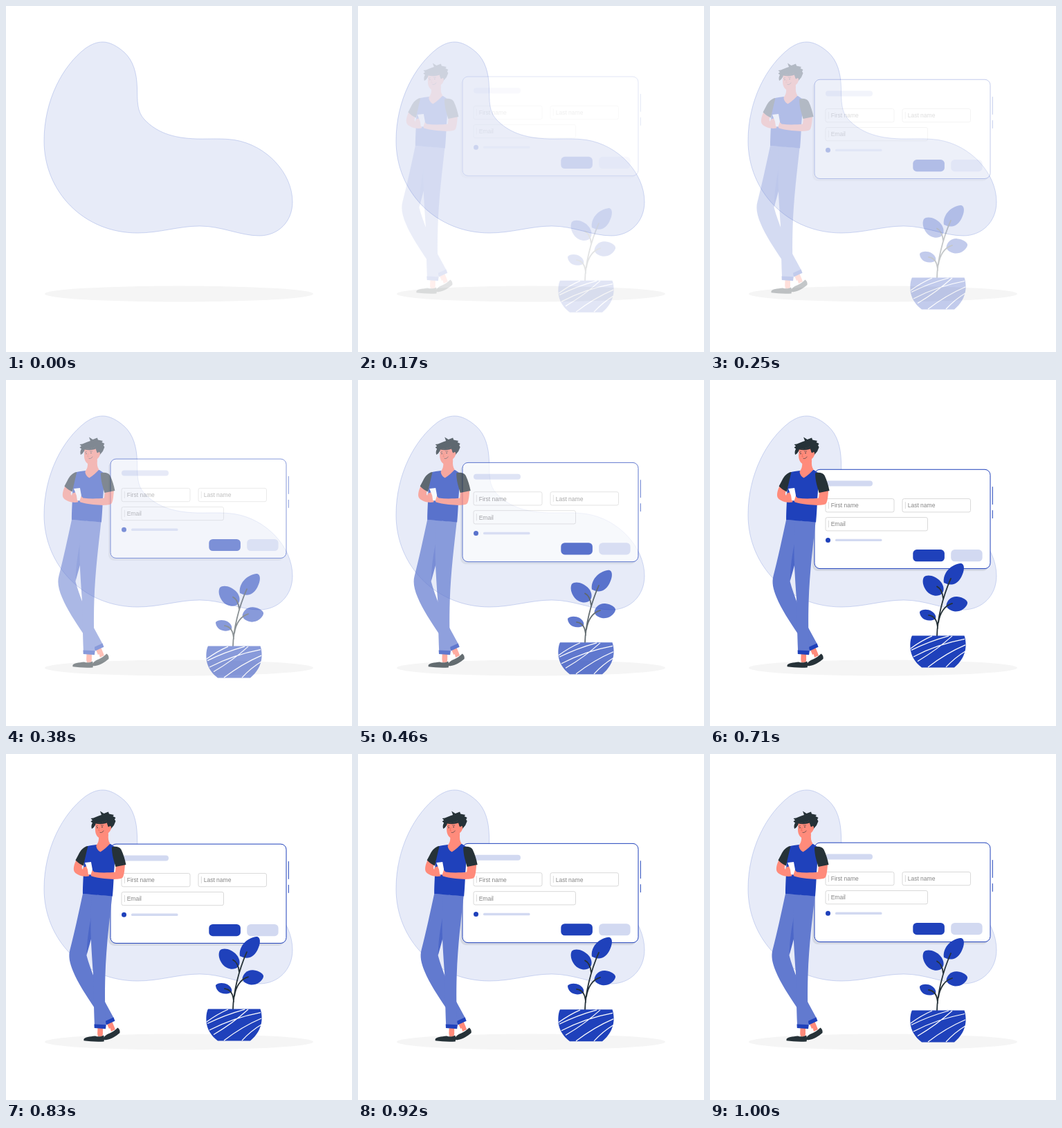
Recreate the animation shown at these times as an HTML page. Size 500x500 px, loop 1040 ms.

```html
<!DOCTYPE html>
<html lang="en">
<head>
<meta charset="utf-8">
<title>Sign-up illustration</title>
<style>
  html, body { margin: 0; width: 100%; height: 100%; overflow: hidden; background: #fff; }
  svg { display: block; width: 100vw; height: 100vh; }
  text { font: 8.5px "Liberation Sans", Arial, sans-serif; fill: #858585; }
  .main { fill: #1f41bb; }
  .pale { fill: #d2d9f1; }
  .mid { fill: #627acf; }
  .dark { fill: #263238; }
  .skin { fill: #ff8b7b; }
  .white { fill: #fff; }
  .line { fill: none; stroke-linecap: round; stroke-linejoin: round; }
  .field { fill: #fff; stroke: #d9d9d9; stroke-width: 1; }
  .caret { stroke: #cfcfcf; stroke-width: .8; }
</style>
</head>
<body>
<svg viewBox="0 0 500 500">
  <path fill="#e7ebf8" stroke="#8a9ddd" stroke-width=".4" d="M140 52C150 52 161 58 171 67C184 79 189 97 189.500 118C190 138 189 152 200 164C217 182 240 191 276 192C296 192.300 312 191 330 193.500C377 201 414 242 414 283C414 312 393 332 366 332C338 332 312 318 280 318C250 318 222 328 190 328C112 328 55 268 55 195C55 136 82 86 115 61C124 55 131 52 140 52Z"/>
  <ellipse cx="250" cy="416" rx="194" ry="11.5" fill="#f5f5f5"/>

  <g id="card">
    <rect x="148" y="132" width="254" height="143" rx="8" fill="#263238" opacity=".1"/>
    <rect x="151" y="128.2" width="254" height="143.3" rx="8" fill="#fff" stroke="#1f41bb"/>
    <path class="line" stroke="#1f41bb" d="M408.3 153.500V178.500M408.3 187.500V198.500"/>
    <rect class="pale" x="167" y="144.5" width="68" height="8" rx="4"/>
    <g id="fields"></g>
    <circle class="main" cx="170.5" cy="230.3" r="3.5"/>
    <rect class="pale" x="181" y="228.6" width="67.5" height="3.4" rx="1.5"/>
    <rect class="main" x="293.3" y="244" width="45.6" height="17.2" rx="5.5"/>
    <rect class="pale" x="348.2" y="244" width="45.4" height="17.2" rx="5.5"/>
  </g>

  <g id="man">
    <!-- back leg, foot -->
    <path class="skin" d="M144 390L151.500 387L156.500 399L149.500 403Z"/>
    <path class="white" d="M146 398L148.500 396L150 401L156 398L155 395L158.500 396L150 405Z"/>
    <path class="dark" d="M139 412C139.500 408 143 405.500 148 403.500C152 402 156 399 159.500 395.500C162 397 163 400 162.500 403C157 408 150 412 143.500 413C140 413.500 139 413 139 412Z"/>
    <path class="mid" d="M109 202L130 203C126 232 118 262 114.500 291C120 312 132 340 141 358L153.500 381L142 387C137 380 131 374 126 367C114 349 102 331 95 314C90 302 88 292 90.500 283C97 258 103 230 109 202Z"/>
    <path fill="#4c67c8" d="M123 228C117 252 115 272 114.500 291L122 264Z"/>
    <path class="main" d="M140.500 386.500L153.500 380.500L155.500 385.800L143 391.500Z"/>
    <!-- front leg, foot -->
    <path class="skin" d="M130.500 396H138V409H130Z"/>
    <path class="white" d="M128 405L130 404L131 408L137 408L138.500 404L140 409L130 411Z"/>
    <path class="dark" d="M110.500 412C112 409 119 408.500 127 407.500C131 409 136 408.500 139 406.500C140.300 409 140.300 413 139.500 415.500C129 416 119 415.500 110.500 414.300Z"/>
    <path class="mid" d="M121.500 203L151.500 205C148 238 143 275 141.500 320C140.700 345 141 370 142.500 392L126 391.500C125 365 124.500 340 124 318C122 290 120 260 120.500 240Z"/>
    <path class="main" d="M125.500 390.500L142.800 391.300L142 397.200L125.800 396Z"/>
    <!-- torso -->
    <path class="main" d="M113 134C119 132 124 131.500 129 131L149 130L155 134C156 148 155 160 154 172C153.500 185 153 195 152 205.500L109 202C109 190 110 175 110.500 160Z"/>
    <path class="skin" d="M132 118L146 116C145.500 122 146 126 148.500 129.500C145 133.500 140 138 134.500 141.500C130 139 128.500 135 128.500 132C132 128 132.500 123 132 118Z"/>
    <!-- arms and phone -->
    <path class="skin" d="M100 152L109 159C108 162 107 165 108.500 166.500C112 167 117 168 119 171L118 176.500C110 178 101 175 97.500 171C94 167 97 158 100 152Z"/>
    <path class="dark" d="M116.500 133C110 134 106 139 103 145L98.500 153.500C102 157 106 160 110 161.500C111.500 155 113 147 116.500 133Z"/>
    <path class="skin" d="M157 160L170 159.500C169.500 167 169 174 167 178C164 182 150 181 140 180C132 179 126 178 121.500 176.500C119.500 173 120.500 169 122.500 167.500L125.500 170.500C136 172 147 171.500 156 170.500Z"/>
    <path class="skin" d="M109 166C112 161 116 162 117.500 166L117 176L112 176Z"/>
    <path class="white" d="M112 157L121 156L123 167L120.500 174.500L117 174L116 167Z"/>
    <path class="dark" d="M151 134.500C156 133 162 134 164.500 138C168 145 170 153 171.500 160L156.500 163C154 154 151 146 151 134.500Z"/>
    <!-- head -->
    <path class="dark" d="M122 108C121 105 121.500 102 123 99.500L120.500 97.500L123 95.500L120.500 93C126 93 130 89.500 136 88L134 82.500L139.500 86L146 83.500L147 86.500L154 88L152.500 90L156.500 92L155 94.500L156.500 97L154 103L149 109L143 110L130 100Z"/>
    <path class="skin" d="M127.500 99C133 100 140 99 143.500 96C144.500 100 144.500 103 146 105C149 102.500 151 105 149.500 109C148.500 112 147 113 146 114C146 119 142 122.500 137.500 122.500C131 122.500 127 117 127 109Z"/>
    <path class="dark" d="M125 98C132 100.500 140 99 144.500 95L149 98L148.500 104L146 105.500L144 99.500C139 101.500 133 101.500 127.500 100.500L125 106L122 108Z"/>
    <circle class="dark" cx="130" cy="106.500" r=".8"/>
    <circle class="dark" cx="137" cy="105.500" r=".8"/>
    <path class="line" stroke="#263238" stroke-width=".6" d="M128.500 104.500L130.500 103.800M135.500 103L138.500 103M134 113.500C136 114 138 113 139 111"/>
    <path class="line" stroke="#e5604f" stroke-width=".6" d="M133 106.500L131.800 110.800L133.500 111"/>
  </g>

  <g id="plant">
    <g class="main">
      <path d="M338 294C336 281 347 268 361.500 266C368.500 265.500 368.500 276 363 286C357 297 348 299 338 294Z"/>
      <path d="M309 286C314 281 326 284 333 292C339 299 338.500 306 335 310C329 315 319 313 313 306C308 300 306 291 309 286Z"/>
      <path d="M341.500 326C343 319 349 313.500 357 314.200C366 315 373 320 372 324C370 331 362 336 354 335.500C347 334.500 342 331 341.500 326Z"/>
      <path d="M303 336C306 332 315 332 320 335C325 338 327 342 326 346C320 350 311 349 307 345C304 342 303 339 303 336Z"/>
    </g>
    <path class="line" stroke="#263238" stroke-width="1.8" d="M328 371C328.500 347 336 315 348 288M330 352C332 338 339 327 350 324M329 360C328.500 349 324 342 316 341M337 317C336 307 333 302 328 299.500"/>
    <path class="main" d="M292 370.500H367.500C369 374 370 381 369.500 387C368.500 399 362 409 353 416.500H306C296 409 290 399 289.500 388C289 381 290 374 292 370.500Z"/>
    <path fill="none" stroke="#fff" stroke-width="1.2" d="M290 389Q305 378 321 371M291 391.500Q316 379 345 371M294 401Q328 383 368 375.500M300 407.500Q328 391 350 371M315 416Q341 396 369 384M341 416Q354 402 369 393"/>
  </g>
</svg>
<script>
  const LOOP = 1040, STEP = 1000 / 24, LEAD = 22, TRAVEL = 30;
  const $ = id => document.getElementById(id);

  const fields = [["First name", 167, 170.5, 99], ["Last name", 278, 170.5, 98.5], ["Email", 167, 197.5, 147.5]];
  $("fields").innerHTML = fields.map(([label, x, y, w]) =>
    `<rect class="field" x="${x}" y="${y}" width="${w}" height="19.3" rx="2.5"/>
     <path class="caret" d="M${x + 4.3} ${y + 4.5}v10"/>
     <text x="${x + 7.7}" y="${y + 12.9}">${label}</text>`).join("");

  // Direction each group starts from, relative to its resting place
  const movers = [["card", 0, -1], ["man", -1, 0], ["plant", 0, 1]]
    .map(([id, dx, dy]) => ({ el: $(id), dx, dy }));

  const bezier = (a, b, s) => 3 * (1 - s) ** 2 * s * a + 3 * (1 - s) * s * s * b + s ** 3;

  // cubic-bezier(.36, -.01, .5, 1.38)
  function ease(x) {
    if (x >= 1) return 1;
    let lo = 0, hi = 1;
    for (let i = 0; i < 24; i++) {
      const s = (lo + hi) / 2;
      if (bezier(.36, .5, s) < x) lo = s; else hi = s;
    }
    return bezier(-.01, 1.38, lo);
  }

  function draw(ms) {
    const step = Math.floor((ms % LOOP + 5) / STEP);
    const p = step < 2 ? 0 : ease((step * STEP + LEAD) / 1000);
    const gap = TRAVEL * (1 - p);
    for (const { el, dx, dy } of movers) {
      el.setAttribute("transform", `translate(${dx * gap} ${dy * gap})`);
      el.setAttribute("opacity", Math.max(0, Math.min(1, p)));
    }
  }

  const start = performance.now();
  function tick() {
    draw(performance.now() - start);
    requestAnimationFrame(tick);
  }
  tick();
</script>
</body>
</html>
```
